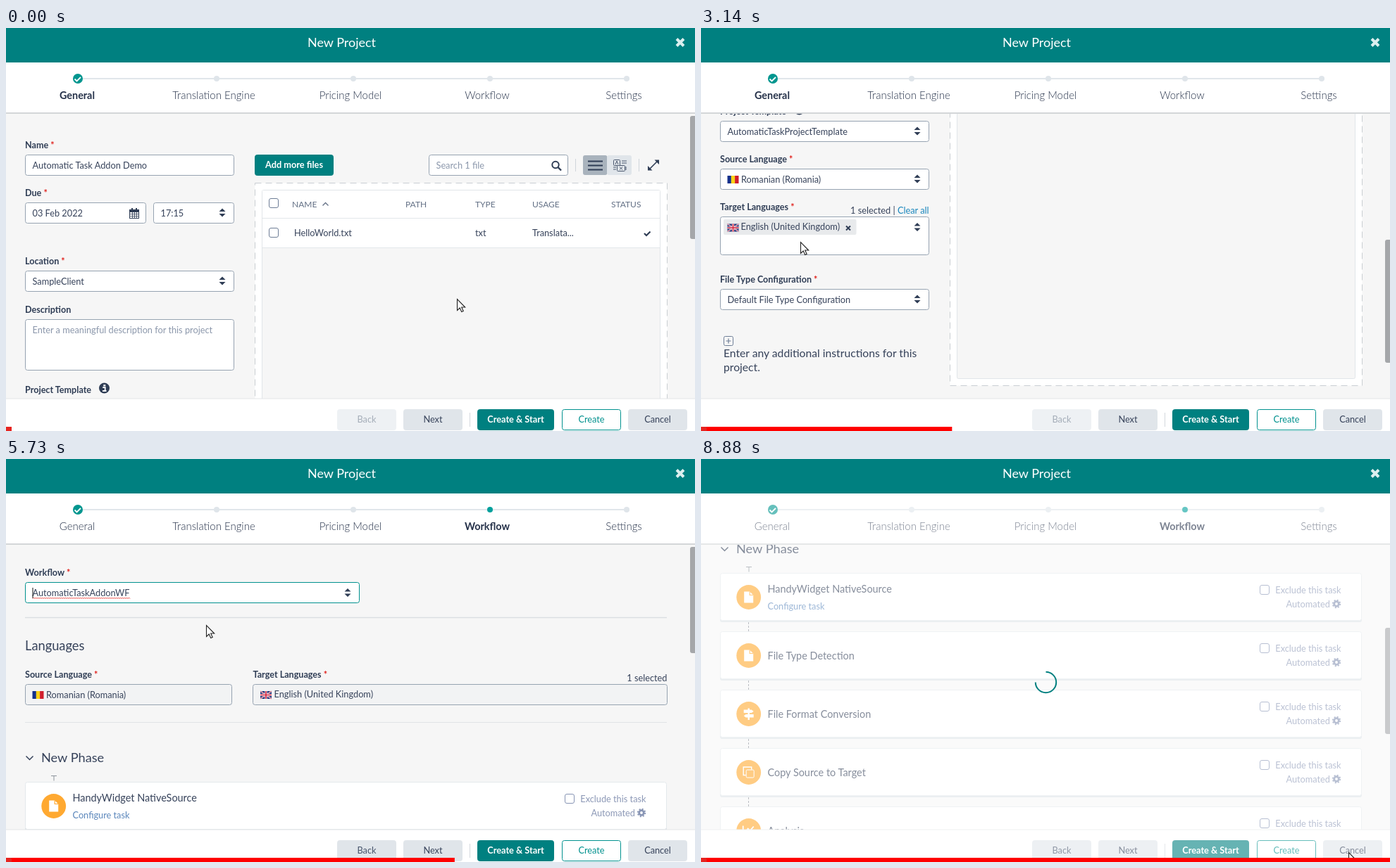
Recreate the animation shown at these times as an HTML page. Size 978x573 px, loop 8.95 s.

```html
<!DOCTYPE html>
<html lang="en">
<head>
<meta charset="utf-8">
<title>New Project</title>
<style>
  html, body { margin: 0; width: 100%; height: 100%; overflow: hidden; background: #fff; }
  svg { display: block; width: 978px; height: 573px; font-family: Lato, "Open Sans", sans-serif; }
  text { white-space: pre; }
</style>
</head>
<body>
<script>
const LOOP = 8950;
const TEAL = '#008080', INK = '#36425a', LABEL = '#2f3d55', MUTED = '#8b97ab', LINE = '#96a3b1';
const SIZE = 12.75;

// ---- drawing helpers, all returning SVG markup ----
const text = (x, y, str, { size = SIZE, fill = INK, weight = 400, anchor = 'start' } = {}) =>
  `<text x="${x}" y="${y}" font-size="${size}" fill="${fill}" font-weight="${weight}" text-anchor="${anchor}">${str}</text>`;
const rect = (x, y, w, h, fill, stroke = 'none', r = 0) =>
  `<rect x="${x}" y="${y}" width="${w}" height="${h}" fill="${fill}" stroke="${stroke}" rx="${r}"/>`;
const path = (d, stroke, width = 1, fill = 'none', more = '') =>
  `<path d="${d}" stroke="${stroke}" stroke-width="${width}" fill="${fill}" ${more}/>`;
const circle = (x, y, r, fill, more = '') => `<circle cx="${x}" cy="${y}" r="${r}" fill="${fill}" ${more}/>`;
const group = (id, body) => `<g id="${id}">${body}</g>`;
const at = (x, y, body) => `<g transform="translate(${x} ${y})">${body}</g>`;

const label = (x, y, str, required = true) =>
  text(x, y, str + (required ? ' <tspan fill="#e0201b">*</tspan>' : ''), { size: 12.6, fill: LABEL, weight: 700 });
const box = (x, y, w, h, fill = '#fff', stroke = LINE) => rect(x + .5, y + .5, w - 1, h - 1, fill, stroke, 3);
const sorter = (x, y) => path(`M${x - 4.5} ${y - 1.5}h9l-4.5 -4.5zM${x - 4.5} ${y + 1.5}h9l-4.5 4.5z`, 'none', 0, LABEL);
const field = (x, y, w, str, fill = INK) => box(x, y, w, 30) + text(x + 10.5, y + 19.5, str, { fill });
const select = (x, y, w, str) => field(x, y, w, str) + sorter(x + w - 17, y + 14.5);
const checkbox = (x, y, stroke = '#6d7d96') => rect(x - 6.5, y - 6.5, 13, 13, '#fff', stroke, 2.5);
const tick = (x, y, color, w = 2) => path(`M${x - 4} ${y}l3 3l5.5 -5.5`, color, w);
const cross = (x, y, r, color, w) => path(`M${x - r} ${y - r}l${2 * r} ${2 * r}m0 ${-2 * r}l${-2 * r} ${2 * r}`, color, w);

const romania = (x, y) => rect(x, y, 5.4, 11, '#14308c') + rect(x + 5.3, y, 5.4, 11, '#fbd116') + rect(x + 10.6, y, 5.4, 11, '#d01f2c');
const britain = (x, y) => at(x, y,
  rect(0, 0, 16, 11, '#1d2f77') +
  path('M0 0L16 11M16 0L0 11', '#e8e8f0', 1.8) + path('M0 0L16 11M16 0L0 11', '#d2233c', .7) +
  path('M8 0V11M0 5.5H16', '#fff', 3.2) + path('M8 0V11M0 5.5H16', '#d2233c', 1.7));

function button(x, w, str, fill, color, { stroke = fill, weight = 400, y = 542 } = {}) {
  return rect(x + .5, y + .5, w - 1, 29, fill, stroke, 3) +
    text(x + w / 2, y + 19, str, { fill: color, weight, anchor: 'middle' });
}

// ---- first page ----
function toolbar() {
  const tools =
    path('M808.5 186v18M898.5 186v18', '#cfd5db') +
    rect(819, 181, 34.5, 28, '#a9b3bd', 'none', 3) + rect(853, 181, 35, 28, '#e0e5ea', 'none', 3) +
    path('M826 189.5h21M826 195.5h21M826 201.5h21', LABEL, 2) +
    rect(862.5, 187.5, 9, 8, 'none', '#4b586e', 1) + rect(867.5, 195.5, 11, 8, '#e0e5ea', '#4b586e', 1) +
    path('M865 194l2 -5l2 5M871 197.5l4 4m0 -4l-4 4M874 189h7M874 192h7M862 198h4M862 201h4M880 197v5', '#4b586e') +
    path('M913 201L925 189', LABEL, 1.6) +
    path('M920.5 187.5h6.5v6.5zM911 196v6.5h6.5z', 'none', 0, LABEL);
  return button(353, 112, 'Add more files', TEAL, '#fff', { weight: 700, y: 180 }) +
    field(600, 180, 198, 'Search 1 file', MUTED) +
    circle(780, 194.5, 4.7, 'none', `stroke="${LABEL}" stroke-width="2"`) + path('M783.5 198l4.5 4.5', LABEL, 2.4) + tools;
}

function fileTable() {
  const heads = [[406, 'NAME'], [567, 'PATH'], [666, 'TYPE'], [747, 'USAGE'], [859, 'STATUS']];
  const cells = [[409, 'HelloWorld.txt'], [666, 'txt'], [747, 'Translata...']];
  return rect(353.5, 220.5, 585, 684, '#fff') +
    path('M353.5 220.5H938.5V904.5H353.5z', '#c9ced3', 1, 'none', 'stroke-dasharray="9 6"') +
    rect(363.5, 230.5, 565, 664, '#f6f6f6', '#e1e5e9', 2) +
    rect(364, 231, 564, 81, '#fff') + path('M364 270.5H928M364 312.5H928', '#e3e7ea') +
    heads.map(([x, s]) => text(x, 254.5, s, { size: 12, fill: '#647186' })).join('') +
    cells.map(([x, s]) => text(x, 296, s)).join('') +
    path('M449.5 252.5l4 -4l4 4', '#647186', 1.3) +
    checkbox(380, 249) + checkbox(380, 291) + tick(910, 292, LABEL, 2.2);
}

function generalPage() {
  const calendar = at(175, 256,
    rect(.5, 2.5, 13, 12, '#fff', LABEL) + rect(0, 2, 14, 4, LABEL) + path('M4 0v4M10 0v4', LABEL, 2) +
    path('M1 8.5h12M1 11.5h12M4.5 6v8M7.5 6v8M10.5 6v8', LABEL, .8));
  const info = circle(139.5, 512, 7.5, LABEL) + rect(138.3, 507, 3, 2.4, '#fff') +
    path('M137.3 511h3.4v5M137 516h5.5', '#fff', 1.8);
  return label(27, 171, 'Name') + field(27, 180, 297, 'Automatic Task Addon Demo') +
    label(27, 239, 'Due') + field(27, 248, 172, '03 Feb 2022') + calendar + select(209, 248, 115, '17:15') +
    label(27, 336, 'Location') + select(27, 345, 297, 'SampleClient') +
    label(27, 404.5, 'Description', false) + box(27, 414, 297, 73) +
    text(37.5, 433.5, 'Enter a meaningful description for this project', { fill: MUTED }) +
    label(27, 518.5, 'Project Template', false) + info + select(27, 528, 297, 'AutomaticTaskProjectTemplate') +
    label(27, 587, 'Source Language') + select(27, 596, 297, '') + romania(37.5, 606) + text(57, 616, 'Romanian (Romania)') +
    label(27, 655, 'Target Languages') +
    text(323.5, 660, '1 selected | <tspan fill="#1a87bd">Clear all</tspan>', { anchor: 'end' }) +
    box(27, 664, 297, 55) + sorter(307, 679) + rect(32, 668, 188.5, 22, '#e8eaec', 'none', 2) +
    britain(37.5, 674.5) + text(56.5, 683, 'English (United Kingdom)') + cross(209, 680.5, 3, LABEL, 2) +
    label(27, 758, 'File Type Configuration') + select(27, 767, 297, 'Default File Type Configuration') +
    rect(32.5, 834.5, 13, 13, 'none', '#6d7d96', 2) + path('M35.5 841h7M39 837.5v7', '#6d7d96', 1.2) +
    text(32, 864, 'Enter any additional instructions for this', { size: 15.7 }) +
    text(32, 884, 'project.', { size: 15.7 }) +
    toolbar() + fileTable();
}

// ---- second page ----
const icons = {
  file: path('M-6.5 -8h8l5 5v11h-13z', 'none', 0, '#fff') + path('M1.5 -8v5h5', '#ffa931', 1.2),
  signs: path('M0 -8V8.5', '#fff', 2.4) + path('M-7 -6h11l3 2.2l-3 2.2h-11zM7 .5h-11l-3 2.2l3 2.2h11z', 'none', 0, '#fff'),
  copy: rect(-3.5, -3.5, 11, 11, 'none', '#fff', 1.5) + path('M-4 4h-3.5v-11.5h11.5v3.5', '#fff', 1.4),
  chart: path('M-8 -7V7H8M-5 2l4 -5l3 3l5 -6', '#fff', 1.8),
};
const gear = (x, y) => circle(x, y, 3.3, 'none', 'stroke="#8794b4" stroke-width="2.8"') +
  circle(x, y, 5.3, 'none', 'stroke="#8794b4" stroke-width="1.8" stroke-dasharray="2.08 2.08"');

function taskCard(name, icon, index) {
  const y = 460 + 83 * index, soft = { fill: '#8c98b6', anchor: 'end' };
  const first = index === 0;
  return (first
      ? path('M64 450.5h8M68 450.5v7', '#8d949c')
      : path(`M67.5 ${y - 14}v13`, '#8d949c', 1, 'none', 'stroke-dasharray="3 2"')) +
    rect(27, y + 2, 911, 67, '#dde3e7', 'none', 3) +
    rect(27.5, y - .5, 910, 67, '#fff', '#e4e9ec', 3) +
    circle(67.7, y + 33.5, 17.4, '#ffa931') + at(67.7, y + 33.5, icons[icon]) +
    text(94.5, y + (first ? 27 : 39), name, { size: 14.45 }) +
    (first ? text(94.5, y + 50.5, 'Configure task', { fill: '#5a86bb' }) : '') +
    checkbox(800, y + 23, '#8794b4') + text(908.5, y + 28, 'Exclude this task', soft) +
    text(893, y + 48, 'Automated', soft) + gear(902, y + 43);
}

function workflowPage() {
  const squiggle = 'M38 198.5' + 'l1.5 -1.5l1.5 1.5'.repeat(46);
  const tasks = [['HandyWidget NativeSource', 'file'], ['File Type Detection', 'file'],
    ['File Format Conversion', 'signs'], ['Copy Source to Target', 'copy'], ['Analysis', 'chart']];
  return label(27, 166, 'Workflow') + box(27, 175, 475, 30, '#fff', '#00918e') + sorter(485, 190) +
    text(37.5, 195, 'AutomaticTaskAddonWF') + path(squiggle, '#e8322c', .9) +
    group('caret', rect(37.5, 183, 1, 15, '#111')) +
    path('M27 225.5H938', '#dadee1', 1.5) + text(27, 272, 'Languages', { size: 18.3 }) +
    label(27, 311, 'Source Language') + box(27, 320, 294, 30, '#f2f3f4') +
    romania(37.5, 330) + text(57, 340, 'Romanian (Romania)') +
    label(350.5, 311, 'Target Languages') + text(938.5, 316, '1 selected', { anchor: 'end' }) +
    box(350, 320, 589, 30, '#f2f3f4') + britain(361, 330) + text(380.5, 339, 'English (United Kingdom)') +
    path('M27 374.5H938', '#e0e3e6') +
    path('M28.5 422.5l5 5l5 -5', INK, 1.5) + text(50, 431, 'New Phase', { size: 18.2 }) +
    tasks.map(([name, icon], i) => taskCard(name, icon, i)).join('');
}

// ---- frame around the pages ----
const steps = ['General', 'Translation Engine', 'Pricing Model', 'Workflow', 'Settings'];
const stepper = active => steps.map((name, i) => {
  const x = 101 + 194 * i, on = i === active;
  return (i ? circle(x + 4, 72, 4, on ? '#00a09c' : '#dfe5ea') : '') +
    text(x, 101, name, { size: on ? 14.4 : 15, weight: on ? 700 : 300, fill: '#26324a', anchor: 'middle' });
}).join('') + circle(102, 72, 7, '#00968f') + tick(101.5, 72.5, '#fff', 1.8);

const chrome =
  rect(0, 49, 978, 72, '#fff') + path('M0 121H978', '#d3d6d8', 2) + path('M102 72H881', '#e1e6eb', 2) +
  rect(0, 0, 978, 49, TEAL) + text(476.5, 27, 'New Project', { size: 18, fill: '#fff', anchor: 'middle' }) +
  cross(957, 20.5, 5, '#dcefef', 4) +
  group('step0', stepper(0)) + group('step3', stepper(3)) +
  rect(0, 527, 978, 46, '#fff') + path('M0 527H978', '#e3e5e7') +
  group('backOff', button(470, 84, 'Back', '#eef1f4', '#a4adb8')) +
  group('backOn', button(470, 84, 'Back', '#e0e5ea', '#46536a')) +
  button(564, 84, 'Next', '#e0e5ea', INK) + path('M658.5 547v20', '#d3d8dd') +
  button(669, 109, 'Create &amp; Start', TEAL, '#fff', { weight: 700 }) +
  button(789, 84, 'Create', '#fff', '#00918e', { stroke: '#00918e' }) +
  button(883, 84, 'Cancel', '#e0e5ea', INK);

const cursors =
  group('arrow', path('M.5 .5v16l3.7 -3.5l2.5 5.5l2.5 -1.1l-2.5 -5.4h5z', '#222', 1.1, '#fff')) +
  group('ibeam', path('M-3 -7.5h2.2l.8 .8l.8 -.8h2.2M0 -7v14M-3 7.5h2.2l.8 -.8l.8 .8h2.2', '#222', 1.2)) +
  group('hand', path('M-1.5 1.5q1.5 -2.5 3 0v7l1 -2q1.5 -1 2.5 .8q1.6 -.8 2.4 .9q1.8 -.4 2.1 1.8v5l-2 4v3h-8v-3q-4 -4 -5.5 -8q1 -2 3 0l1.5 2z',
    '#222', 1.2, '#fff'));

document.body.innerHTML = `<svg viewBox="0 0 978 573">
  <clipPath id="view"><rect y="122" width="978" height="405"/></clipPath>
  ${rect(0, 0, 978, 573, '#f6f6f6')}
  <g clip-path="url(#view)">${group('general', generalPage())}${group('workflow', workflowPage())}</g>
  <rect id="thumb" x="971" width="9" rx="3" fill="#a5a7aa"/>
  ${chrome}
  ${group('busy', rect(0, 49, 978, 524, '#fff" fill-opacity=".4') +
    group('spinner', path('M-14.7 0A14.7 14.7 0 1 0 0 -14.7', TEAL, 2)))}
  ${group('cursor', cursors)}
  <rect id="bar" y="567" height="6" fill="#f00"/>${rect(0, 567, 8, 6, '#e62420')}
</svg>`;

// ---- motion: keys are [time, ...values], eased between neighbours ----
const scrollGeneral = [[1080, 0], [1240, 99], [1330, 99], [1490, 198], [1600, 198], [1760, 297], [2930, 297], [3090, 396]];
const scrollWorkflow = [[5740, 0], [5900, 99], [5930, 99], [6122, 198], [7270, 198], [7464, 297]];
const pointer = [[100, 640, 385], [900, 385, 304], [1000, 378, 307], [2100, 378, 307], [2500, 64, 243], [2790, 110, 300],
  [3080, 130, 310], [3720, 568, 66], [3770, 568, 66], [4050, 683, 80], [4180, 683, 80], [4640, 500, 192], [5150, 284, 236],
  [5740, 284, 236], [5900, 283, 260], [6450, 283, 260], [7100, 510, 334], [7500, 510, 334], [8150, 722, 552],
  [8450, 722, 552], [8800, 919, 559]];
const PAGE_SWITCH = 4180;

const PICTURES = 129, RATE_CHANGE = 1950, FAST_COUNT = 29, HOLD = 70;
const pictureAt = t => Math.floor(.2 + (t < RATE_CHANGE
  ? t * FAST_COUNT / RATE_CHANGE
  : FAST_COUNT + (t - RATE_CHANGE) / HOLD));
const timeOf = n => n < FAST_COUNT ? n * RATE_CHANGE / FAST_COUNT : RATE_CHANGE + (n - FAST_COUNT) * HOLD;

function along(keys, t) {
  const i = keys.findIndex(k => k[0] > t);
  if (i === 0) return keys[0].slice(1);
  if (i < 0) return keys.at(-1).slice(1);
  const a = keys[i - 1], b = keys[i], u = (t - a[0]) / (b[0] - a[0]), e = u * u * (3 - 2 * u);
  return a.slice(1).map((v, n) => v + (b[n + 1] - v) * e);
}

const el = id => document.getElementById(id);
const set = (id, name, value) => el(id).setAttribute(name, value);
const show = (id, on) => { el(id).style.display = on ? '' : 'none'; };

function draw(elapsed) {
  const picture = Math.min(PICTURES - 1, pictureAt(elapsed)), t = timeOf(picture);
  const second = t >= PAGE_SWITCH;
  const [scroll] = along(second ? scrollWorkflow : scrollGeneral, t);
  for (const id of ['general', 'step0', 'backOff']) show(id, !second);
  for (const id of ['workflow', 'step3', 'backOn']) show(id, second);
  set(second ? 'workflow' : 'general', 'transform', `translate(0 ${-Math.round(scroll)})`);
  set('thumb', 'y', 125 + scroll / (second ? 2.58 : 2.25));
  set('thumb', 'height', second ? 151 : 175);
  show('caret', Math.floor((t + 230) / 530) % 2 === 1);

  const [x, y] = along(pointer, t);
  const shape = t > 3600 && t < 4300 ? 'hand'
    : (t > 2400 && t < 2600) || (t > 5850 && t < 6500) ? 'ibeam' : 'arrow';
  for (const id of ['arrow', 'ibeam', 'hand']) show(id, id === shape);
  set('cursor', 'transform', `translate(${Math.round(x)} ${Math.round(y)})`);

  show('busy', t >= 8450);
  set('busy', 'opacity', Math.min(1, Math.max(0, (t - 8450) / 150)));
  set('spinner', 'transform', `translate(489.5 317.5) rotate(${(t - 8880) * .36})`);
  set('bar', 'width', 978 * (picture + 1) / PICTURES);
}

const start = performance.now();
function play(now) {
  draw(Math.max(0, now - start) % LOOP);
  requestAnimationFrame(play);
}
draw(0);
requestAnimationFrame(play);
</script>
</body>
</html>
```
